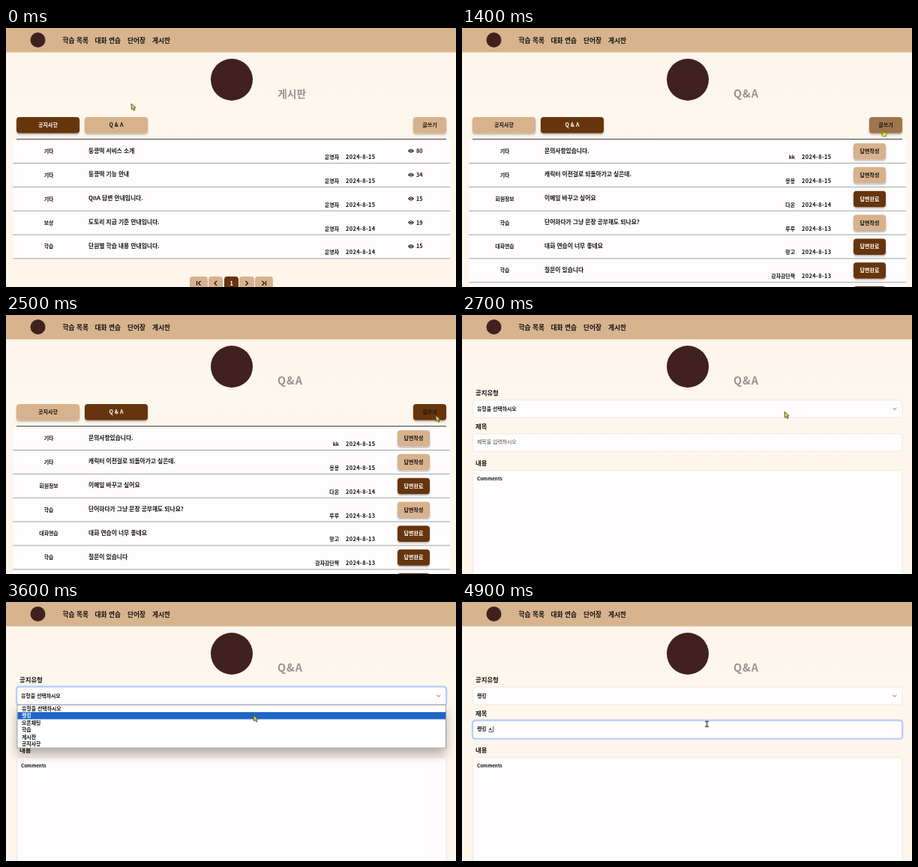
Write an HTML page that moves like this. It is 600 px wide and 346 px high and loops after 5 s.

```html
<!DOCTYPE html>
<html lang="ko">
<head>
<meta charset="utf-8">
<title>게시판</title>
<style>
  html, body { margin: 0; width: 100%; height: 100%; overflow: hidden; background: #fef6eb; }
  svg { display: block; width: 600px; height: 346px; }
  text {
    font-family: "Noto Sans CJK KR", "Noto Sans CJK", "Noto Sans", sans-serif;
    font-weight: 700; fill: #151210; white-space: pre;
  }
  .heavy { font-weight: 900; }
</style>
</head>
<body>
<svg id="stage" viewBox="0 0 600 346" xmlns="http://www.w3.org/2000/svg">
  <defs>
    <linearGradient id="paper" x2="0" y2="1">
      <stop stop-color="#fdf4e9"/><stop offset=".3" stop-color="#fef7ee"/><stop offset="1" stop-color="#fef5ea"/>
    </linearGradient>
    <filter id="lift" x="-20%" y="-30%" width="140%" height="180%">
      <feDropShadow dx="0" dy="1.6" stdDeviation="1.2" flood-color="#000" flood-opacity=".32"/>
    </filter>
    <filter id="float" x="-5%" y="-40%" width="110%" height="220%">
      <feDropShadow dx="0" dy="8" stdDeviation="7" flood-color="#000" flood-opacity=".3"/>
    </filter>
  </defs>
</svg>
<script>
const TAN = '#d7b28d', BROWN = '#66350c', INK = '#151210', LOGO = '#40211f', WHITE = '#fefcfd';
const LOOP = 5000, STEP = 100, ROW = 31.85;
const stage = document.getElementById('stage');

const rect = (x, y, w, h, fill, more = '') =>
  `<rect x="${x}" y="${y}" width="${w}" height="${h}" fill="${fill}" ${more}/>`;
const label = (x, y, size, str, more = '') =>
  `<text x="${x}" y="${y}" font-size="${size}" ${more}>${str.replace(/&/g, '&amp;')}</text>`;
const mid = 'text-anchor="middle"', end = 'text-anchor="end"', heavy = 'class="heavy"';
const white = 'style="fill:#fff"', grey = 'style="fill:#999290"';
const rule = (y, x1, x2, color) => `<path d="M${x1} ${y}H${x2}" stroke="${color}"/>`;
const button = (x, y, w, str, dark, id = '') =>
  rect(x, y, w, 21.5, dark ? BROWN : TAN, `rx="4" filter="url(#lift)" ${id && `id="${id}"`}`) +
  label(x + w / 2, y + 13, 7, str, mid + (dark ? ' ' + white : ''));
const group = (id, body) => `<g id="${id}">${body}</g>`;

const row = (i, [kind, title, author, day], tail) => {
  const y = 149 + i * ROW;
  return label(57, y + 18, 6.9, kind, mid) + label(110, y + 17.6, 7.75, title, heavy) +
    label(444, y + 26, 6.9, author, end) +
    label(453, y + 26, 7.4, '2024-8-' + day, 'letter-spacing=".4"') +
    tail(y) + rule(y + ROW - .3, 9, 592, '#a5a0a0');
};
const views = n => y =>
  `<path d="M536 ${y + 15.3}q4 -5.4 8 0q-4 5.4 -8 0z" fill="${INK}"/>
   <circle cx="540" cy="${y + 15.3}" r="1.5" fill="${INK}" stroke="#fff" stroke-width=".8"/>` +
  label(547, y + 18, 7.2, n);
const reply = done => y => button(522, y + 5, 43, done ? '답변완료' : '답변작성', done);

const notices = [
  ['기타', '둥콩떡 서비스 소개', '운영자', 15, '80'],
  ['기타', '둥콩떡 기능 안내', '운영자', 15, '34'],
  ['기타', 'QnA 답변 안내입니다.', '운영자', 15, '15'],
  ['보상', '도토리 지급 기준 안내입니다.', '운영자', 14, '19'],
  ['학습', '단원별 학습 내용 안내입니다.', '운영자', 14, '15']
];
const questions = [
  ['기타', '문의사항있습니다.', 'kk', 15, false],
  ['기타', '캐릭터 이전걸로 되돌아가고 싶은데.', '몽몽', 15, false],
  ['회원정보', '이메일 바꾸고 싶어요', '다온', 14, true],
  ['학습', '단어하다가 그냥 문장 공부해도 되나요?', '루루', 13, false],
  ['대화연습', '대화 연습이 너무 좋네요', '망고', 13, true],
  ['학습', '질문이 있습니다', '감자감단짝', 13, true],
  ['', '', '', 13, true]
];

function pager() {
  const marks = ['M-2.5 -3V3M2.5 -3L-.5 0L2.5 3', 'M1.5 -3L-1.5 0L1.5 3', '',
    'M-1.5 -3L1.5 0L-1.5 3', 'M2.5 -3V3M-2.5 -3L.5 0L-2.5 3'];
  return [[245, 24], [270, 19], [291, 19], [311, 20], [332, 24]].map(([x, w], i) =>
    rect(x, 332, w, 20, i === 2 ? BROWN : TAN, 'rx="4"') +
    (marks[i]
      ? `<path d="${marks[i]}" transform="translate(${x + w / 2} 341)" fill="none" stroke="${INK}" stroke-width="1.2"/>`
      : label(x + w / 2, 344, 8, '1', mid + ' ' + white))).join('');
}

const options = ['유형을 선택하시오', '랭킹', '오픈채팅', '학습', '게시판', '공지사항'];
const field = (y, h) => rect(14.5, y, 572.5, h, WHITE, 'rx="3" stroke="#ece5e0" stroke-width=".8"');
const ring = (id, y) =>
  `<rect id="${id}" x="14" y="${y - .7}" width="573.2" height="24.9" rx="3.8" fill="none" stroke="#b9d0f6" stroke-width="2.4"/>`;

const header =
  rect(0, 0, 600, 346, 'url(#paper)') + rect(0, 0, 600, 32.5, '#d7b38e') +
  `<circle cx="42.5" cy="16" r="10" fill="${LOGO}"/><circle cx="301" cy="69" r="28" fill="${LOGO}"/>` +
  [[75.5, '학습 목록'], [118.5, '대화 연습'], [162, '단어장'], [195, '게시판']]
    .map(([x, s]) => label(x, 19.8, 8.7, s, heavy)).join('');

const board =
  button(14, 119, 84, '공지사항', false, 'tabNotice') +
  button(105, 119, 84, 'Q & A', false, 'tabQna') +
  button(543, 119, 44, '글쓰기', false, 'write');

const listing =
  group('notice', label(362, 92.5, 13.8, '게시판', grey) + rect(9, 149, 583, 159, WHITE) +
    notices.map((n, i) => row(i, n, views(n[4]))).join('') + pager()) +
  group('qna', rect(9, 149, 583, 197, WHITE) +
    questions.map((q, i) => row(i, q, reply(q[4]))).join('')) +
  rule(148.5, 14, 587, '#45403e');

const form =
  label(18, 107, 8.4, '공지유형', heavy) + field(113.7, 23.5) + ring('selectRing', 113.7) +
  label(20, 127.6, 6.9, '', 'id="choice"') +
  `<path d="M574.5 124.2l2.4 2.3l2.4 -2.3" fill="none" stroke="#555" stroke-width=".9"/>` +
  label(18, 152, 8.4, '제목', heavy) + field(158.7, 23.5) + ring('titleRing', 158.7) +
  label(20, 172.2, 6.9, '제목을 입력하시오', 'id="hint" style="fill:#4a4644;font-weight:500"') +
  label(20, 172.2, 6.9, '', 'id="typed"') +
  `<path id="under" stroke="${INK}" stroke-width=".7"/><path id="caret" stroke="${INK}" stroke-width=".7"/>` +
  label(18, 201, 8.4, '내용', heavy) + field(207.5, 150) +
  label(20, 221, 6.3, 'Comments') +
  group('menu', rect(15, 137.5, 571.5, 57.5, '#fff', 'stroke="#8d8d93" stroke-width=".8" filter="url(#float)"') +
    rect(15.4, 137.6, 570.8, 9.5, '#2066c8', 'id="mark"') +
    options.map((o, i) => label(21, 144.5 + i * 9.5, 6.9, o, 'class="option"')).join(''));

const beam = 'M-2.4 -3.4H2.4M-2.4 3.4H2.4M0 -3.4V3.4';
const pointers =
  group('arrow', `<path d="M0 0L.4 8L2.2 6.4L3.6 9.2L5 8.5L3.8 5.8L6 5.5Z" fill="#d3dc4a" stroke="#3a3a18" stroke-width=".8"/>`) +
  group('hand', `<path d="M0 .8Q.8 -.4 1.6 .8V3.4L4.6 4.1Q5.4 4.6 5 6.2L4.2 9H.4L-2 5.8Q-2 4.6 0 5.4Z" fill="#d9e83c" stroke="#4c5414" stroke-width=".7"/>`) +
  group('beam', `<path d="${beam}" stroke="#76563c" stroke-width="1.6"/>`);

stage.insertAdjacentHTML('beforeend', header + group('board', listing + board) +
  label(362, 93.4, 14.4, 'Q&A', 'id="heading" letter-spacing="1" ' + grey) + group('form', form) +
  group('status', rect(-3, 336.5, 41, 12, '#d9e1ee', 'rx="2"') +
    label(0, 344, 6, '/board/qna/1', 'style="fill:#687080;font-weight:400"')) + pointers);

const el = {};
stage.querySelectorAll('[id]').forEach(e => el[e.id] = e);
const optionTexts = [...stage.querySelectorAll('.option')];
const show = (e, on) => e.style.display = on ? '' : 'none';
const clamp = v => Math.max(0, Math.min(1, v));
const blend = k => {
  const a = [215, 178, 141], b = [102, 53, 12];
  return `rgb(${a.map((v, i) => Math.round(v + (b[i] - v) * k))})`;
};

// time, x, y of the pointer
const path = [
  [0, 167, 101], [300, 156, 127], [700, 156, 127], [1000, 370, 165], [1300, 560, 139],
  [1400, 561, 136], [2100, 563, 136], [2500, 573, 134], [2800, 380, 127.5], [3000, 380, 127.5],
  [3300, 345, 189], [3600, 330, 151], [3700, 330, 151], [3900, 326.5, 163], [LOOP, 326.5, 163]
];
function pointerAt(t) {
  const i = path.findIndex(p => p[0] > t);
  const [t0, x0, y0] = path[i - 1], [t1, x1, y1] = path[i];
  const k = (t - t0) / (t1 - t0), e = k * k * (3 - 2 * k);
  return [x0 + (x1 - x0) * e, y0 + (y1 - y0) * e];
}

const strokes = ['', 'ㄹ', '래', '랭', '랭키', '랭킹', '랭킹 ', '랭킹 ㅅ'];

function drawForm(t, y) {
  const open = t >= 3000 && t < 3700;
  const hot = t < 3100 ? 0 : Math.max(0, Math.min(5, Math.floor((y - 137.6) / 9.5)));
  show(el.menu, open);
  el.mark.setAttribute('y', 137.6 + hot * 9.5);
  optionTexts.forEach((o, i) => o.style.fill = i === hot ? '#fff' : INK);
  el.choice.textContent = options[t < 3700 ? 0 : 1];

  const focus = clamp((t - 4000) / 150);
  el.selectRing.style.opacity = clamp((t - 2800) / 150) * (1 - focus);
  el.titleRing.style.opacity = focus;

  const n = Math.max(0, Math.min(7, (t - 4200) / STEP));
  const str = strokes[n];
  el.typed.textContent = str;
  show(el.hint, !str);
  const x = 20.8 + (str ? el.typed.getComputedTextLength() : 0);
  show(el.caret, t >= 4000);
  el.caret.setAttribute('d', `M${x} 166V174`);
  const composing = str && !str.endsWith(' ');
  show(el.under, composing);
  el.under.setAttribute('d', `M${x - 6.6} 173.6H${x - .6}`);
}

function draw(t) {
  const qna = t >= 500, writing = t >= 2600;
  const [x, y] = pointerAt(t);
  show(el.board, !writing);
  show(el.form, writing);
  show(el.notice, !qna);
  show(el.qna, qna);
  show(el.heading, qna);
  show(el.status, t >= 300 && t < 900);

  el.tabNotice.setAttribute('fill', qna ? TAN : BROWN);
  el.tabNotice.nextSibling.style.fill = qna ? INK : '#fff';
  el.tabQna.setAttribute('fill', blend(clamp((t - 200) / 200)));
  el.tabQna.nextSibling.style.fill = qna ? '#fff' : INK;
  el.write.setAttribute('fill', blend(clamp((t - 1300) / 200)));

  if (writing) drawForm(t, y);

  const kind = t >= 3900 ? 'beam'
    : (t >= 300 && t < 800) || (t >= 1300 && t < 2500) ? 'hand' : 'arrow';
  for (const k of ['arrow', 'hand', 'beam']) show(el[k], k === kind);
  el[kind].setAttribute('transform', `translate(${x} ${y})`);
}

const start = performance.now();
function tick() {
  const t = (performance.now() - start) % LOOP;
  draw(Math.floor(t / STEP) * STEP);
  requestAnimationFrame(tick);
}
tick();
</script>
</body>
</html>
```
